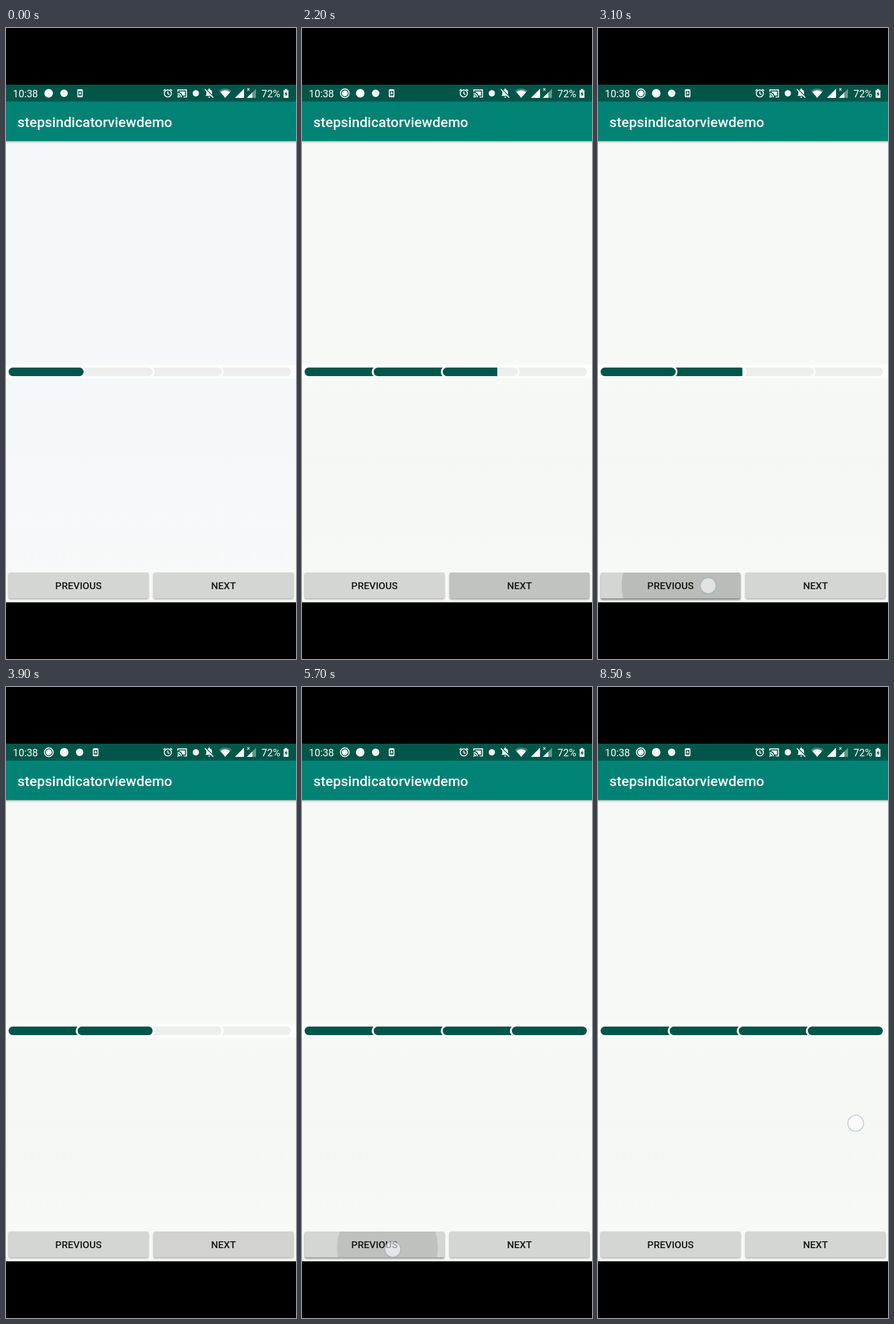
Recreate the animation shown at these times as an HTML page. Size 508 px wide and 1102 px high, loop 8.6 s.

```html
<!DOCTYPE html>
<html lang="en">
<head>
<meta charset="utf-8">
<title>Steps indicator</title>
<style>
html, body { margin: 0; width: 100%; height: 100%; overflow: hidden; background: #000; }
svg { display: block; width: 100vw; height: 100vh; }
text { font-family: Roboto, sans-serif; }
.label { font-size: 17.3px; font-weight: 500; text-anchor: middle; fill: #141614; }
.clock { font-size: 17.7px; fill: #fff; }
.line { fill: none; stroke: #fff; stroke-width: 1.7; }
.seg { stroke: #fff; stroke-width: 6.5; paint-order: stroke; }
</style>
</head>
<body>
<svg viewBox="0 0 508 1102">
  <defs>
    <linearGradient id="page" x2="0" y2="1">
      <stop offset="0" stop-color="#f7f9f6"/>
      <stop offset=".5" stop-color="#f7f9f6"/>
      <stop offset=".7" stop-color="#f5f7f4"/>
      <stop offset="1" stop-color="#f8faf7"/>
    </linearGradient>
    <linearGradient id="cool" x2="0" y2="1">
      <stop offset="0" stop-color="#f4f8fa"/>
      <stop offset=".5" stop-color="#f4f8fa"/>
      <stop offset="1" stop-color="#f8f9f9"/>
    </linearGradient>
    <linearGradient id="drop" x2="0" y2="1">
      <stop offset="0" stop-opacity=".24"/>
      <stop offset="1" stop-opacity="0"/>
    </linearGradient>
    <filter id="soft" x="-5%" y="-30%" width="110%" height="160%"><feGaussianBlur stdDeviation="1.4"/></filter>
    <clipPath id="screen"><rect y="99" width="508" height="904"/></clipPath>
    <clipPath id="wipe"><rect id="wipeBox" y="585" height="31"/></clipPath>
  </defs>

  <rect width="508" height="1102"/>
  <g clip-path="url(#screen)">
    <rect y="197" width="508" height="806" fill="url(#page)"/>
    <rect id="tint" y="197" width="508" height="806" fill="url(#cool)"/>
    <rect y="197" width="508" height="5" fill="url(#drop)"/>
    <rect y="128" width="508" height="69.5" fill="#008375"/>
    <rect y="99" width="508" height="29.5" fill="#015649"/>
    <text x="20" y="173" font-size="24.7" font-weight="500" fill="#fff">stepsindicatorviewdemo</text>

    <text class="clock" x="12" y="120.7">10:38</text>
    <g id="record">
      <circle class="line" cx="75" cy="114" r="7.6" stroke-width="1.5"/>
      <circle cx="75" cy="114" r="5.2" fill="#fff"/>
    </g>
    <g id="notes" fill="#fff">
      <circle cx="102" cy="114" r="7.5"/>
      <circle cx="129" cy="114" r="6.5"/>
      <g transform="translate(157 114)">
        <rect class="line" x="-4" y="-6.2" width="8" height="12.4" rx="1"/>
        <path d="M-4 -6h8v2h-8zM-4 4h8v2h-8zM-.8 -3h1.6v2.6h2L0 2.6 -2.8 -.4h2z"/>
      </g>
    </g>

    <g transform="translate(283.5 114.3)">
      <circle class="line" r="6.2"/>
      <path class="line" d="M0 -3.6V.4L2.8 2M-7.6 -4.6L-4.2 -7.5M7.6 -4.6L4.2 -7.5"/>
    </g>
    <g transform="translate(308.5 114.3)">
      <path class="line" d="M-7.5 -3V-6.2H7.7V6.2H2.5M-8 -.2A6.7 6.7 0 0 1 -1.3 6.6M-8 2.9A3.7 3.7 0 0 1 -4.4 6.6"/>
      <path d="M-4.8 -3.6H5V3.6H.8A9 9 0 0 0 -4.8 -2.3z" fill="#fff"/>
      <circle cx="-7" cy="6" r="1.2" fill="#fff"/>
    </g>
    <circle cx="332.5" cy="114" r="5.5" fill="#fff"/>
    <g transform="translate(356 114)">
      <path d="M-7 4.6L-5 2.6V-1.4C-5 -4 -3.4 -5.8 -1.2 -6.4V-7.2A1.2 1.2 0 0 1 1.2 -7.2V-6.4C3.4 -5.8 5 -4 5 -1.4V2.6L7 4.6zM-1.7 6h3.4a1.7 1.7 0 0 1 -3.4 0z" fill="#fff"/>
      <path d="M-6.3 -8L8.7 7" stroke="#015649" stroke-width="1.6"/>
      <path class="line" d="M-7.7 -7L7 7.7" stroke-width="1.5"/>
    </g>
    <path d="M384 122L373 109.5Q384 102 395 109.5z" fill="#fff" opacity=".28"/>
    <path d="M384 122L375.5 112Q384 105.5 392.5 112z" fill="#fff"/>
    <path d="M401 122L417 106V122z" fill="#fff"/>
    <path d="M422 122L438 106V122z" fill="#fff" opacity=".38"/>
    <path d="M422 122L431.5 112.5V122z" fill="#fff"/>
    <path d="M422.5 105l4 4.6m0 -4.6l-4 4.6" stroke="#fff" stroke-width="1.1"/>
    <text class="clock" x="447.5" y="120.7">72%</text>
    <path d="M486.3 108.6h2.2v-2h3.8v2h2.4V122h-8.4z" fill="#fff"/>
    <path d="M491.5 110.2L488 115.8h2V120l3.2 -5.6h-1.8z" fill="#015649"/>

    <rect y="588" width="508" height="24" fill="#fff"/>
    <g id="bar">
      <g id="lights"></g>
      <g clip-path="url(#wipe)"><g id="back"></g></g>
      <g id="darks"></g>
      <g clip-path="url(#wipe)"><g id="front"></g></g>
    </g>
    <g id="buttons"></g>
    <circle id="dot" r="13.8" fill="#fff" fill-opacity=".58" stroke="#8097b4" stroke-opacity=".42" stroke-width="1.8"/>
  </g>
</svg>
<script>
const LOOP = 8600, GROW = 300, STEP = 121, SEG_X = 4.5, SEG_W = 131.5;
const BTN = { w: 245, h: 45, y: 951 };

// press time, click time, direction, touch x, touch y
const taps = [
  [1150, 1220, 1, 420, 975],
  [1935, 2006, 1, 425, 968],
  [2480, 2550, -1, 190, 975],
  [3005, 3067, -1, 193, 974],
  [3540, 3610, 1, 420, 965],
  [4110, 4180, 1, 416, 960],
  [4670, 4740, 1, 415, 957],
  [5640, 5715, -1, 159, 982],
  [6598, 6706, 1, 430, 970]
].map(([press, click, dir, x, y]) => ({ press, click, dir, x, y }));

// touches outside the buttons: start, end, x, y
const strays = [[7480, 7590, 417, 762], [7880, 8080, 474, 765], [8480, 8600, 451.5, 762]];

const $ = id => document.getElementById(id);
const clamp = v => Math.max(0, Math.min(1, v));
const mix = (a, b, p) => a + (b - a) * p;
const inOut = p => (1 - Math.cos(Math.PI * clamp(p))) / 2;

// cubic-bezier(.4, 0, .2, 1)
function fastOut(x) {
  let lo = 0, hi = 1;
  for (let i = 0; i < 20; i++) {
    const s = (lo + hi) / 2, r = 1 - s;
    if (1.2 * r * r * s + .6 * r * s * s + s ** 3 < x) lo = s; else hi = s;
  }
  return 3 * (1 - lo) * lo * lo + lo ** 3;
}

function add(tag, attrs, parent) {
  const el = document.createElementNS("http://www.w3.org/2000/svg", tag);
  set(el, attrs);
  parent.appendChild(el);
  return el;
}
function set(el, attrs) {
  for (const k in attrs) el.setAttribute(k, attrs[k]);
}

const segX = k => SEG_X + STEP * (k - 1);
const segment = (k, fill, parent) =>
  add("rect", { class: "seg", x: segX(k), y: 593, width: SEG_W, height: 15, rx: 7.5, fill }, parent);

for (const k of [4, 3, 2, 1]) segment(k, "#ecefec", $("lights"));
const darks = [1, 2, 3, 4].map(k => segment(k, "#015649", $("darks")));
const movers = { "1": segment(1, "#015649", $("front")), "-1": segment(1, "#015649", $("back")) };

function makeButton(x, name, dir) {
  const box = { x, y: BTN.y, width: BTN.w, height: BTN.h, rx: 2.5 };
  const root = $("buttons");
  const clip = add("clipPath", { id: "clip" + name }, root);
  add("rect", box, clip);
  const shadow = add("rect", { ...box, filter: "url(#soft)" }, root);
  add("rect", { ...box, fill: "#d4d6d3" }, root);
  const ripple = add("circle", {}, add("g", { "clip-path": `url(#clip${name})` }, root));
  add("text", { class: "label", x: x + BTN.w / 2, y: 980 }, root).textContent = name;
  return { dir, cx: x + BTN.w / 2, cy: BTN.y + BTN.h / 2, shadow, ripple };
}
const buttons = [makeButton(4.5, "PREVIOUS", -1), makeButton(258.5, "NEXT", 1)];

function drawBar(t) {
  let level = 1, p = 1, dir = 1;
  for (const tap of taps) {
    if (t < tap.click) break;
    level += tap.dir;
    dir = tap.dir;
    p = inOut((t - tap.click) / GROW);
  }
  const moving = p < 1;
  const k = dir > 0 ? level : level + 1;
  darks.forEach((el, i) => {
    const on = i < level && !(moving && dir > 0 && i === level - 1);
    el.setAttribute("visibility", on ? "visible" : "hidden");
  });
  for (const d of [1, -1]) {
    const on = moving && d === dir;
    set(movers[d], { x: segX(k), visibility: on ? "visible" : "hidden" });
  }
  set($("wipeBox"), { x: segX(k) - 5, width: 5 + SEG_W * (dir > 0 ? p : 1 - p) });
}

function drawButton(b, t) {
  const tap = taps.find(a => a.dir === b.dir && t >= a.press && t < a.press + 400);
  const age = tap ? t - tap.press : 0;
  const lift = tap ? clamp(age / 100) * clamp((300 - age) / 100) : 0;
  set(b.shadow, {
    transform: `translate(0 ${1.5 + 1.5 * lift})`,
    opacity: .34 + .1 * lift
  });
  if (!tap) return b.ripple.setAttribute("opacity", 0);
  const p = fastOut(clamp(age / 225));
  set(b.ripple, {
    cx: mix(tap.x, b.cx, p),
    cy: mix(tap.y, b.cy, p),
    r: mix(BTN.w * .3, Math.hypot(BTN.w, BTN.h) / 2, p),
    opacity: .122 * clamp(age / 75) * clamp(1 - (age - 225) / 150)
  });
}

function drawDot(t) {
  const touches = taps.map(a => [a.press, a.press + 115, a.x, a.y]).concat(strays);
  const hit = touches.find(([a, b]) => t >= a && t < b);
  set($("dot"), hit ? { cx: hit[2], cy: hit[3], opacity: 1 } : { opacity: 0 });
}

function draw(t) {
  const slide = fastOut(clamp((t - 60) / 300));
  $("notes").setAttribute("transform", `translate(${-27.3 * (1 - slide)} 0)`);
  $("record").setAttribute("opacity", clamp(t / 200));
  $("tint").setAttribute("opacity", 1 - clamp((t - 60) / 340));
  drawBar(t);
  buttons.forEach(b => drawButton(b, t));
  drawDot(t);
}

const start = performance.now();
function tick() {
  draw((performance.now() - start) % LOOP);
  requestAnimationFrame(tick);
}
tick();
</script>
</body>
</html>
```
